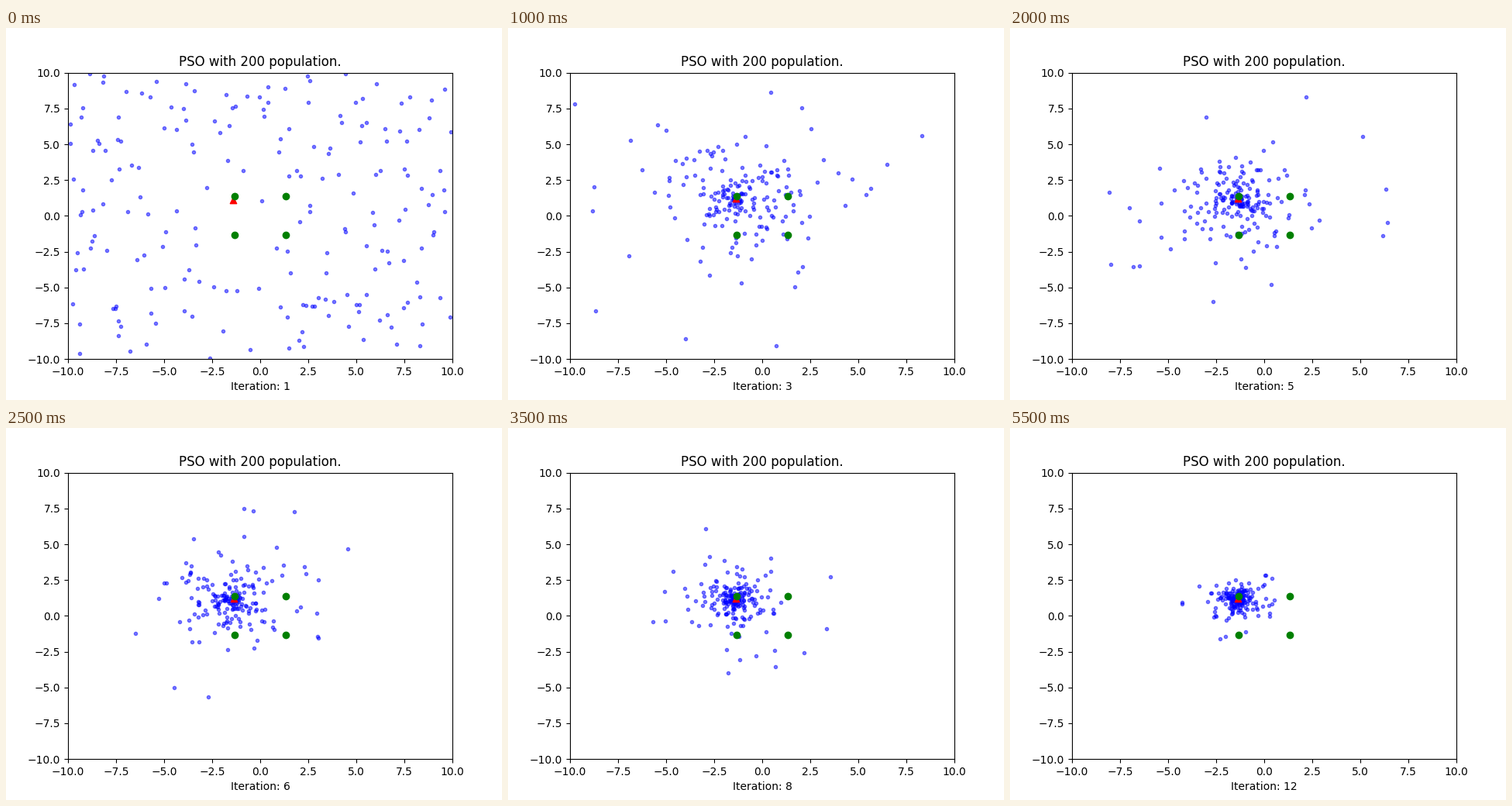
A matplotlib script for the animation above (6000 ms loop, 640 by 480 pixels).

```python
import numpy as np
import matplotlib.pyplot as plt
from matplotlib.animation import FuncAnimation

COUNT, STEPS = 200, 12
CENTER = np.array([-1.4, 1.15])
OPTIMUM = 1.3494

plt.rcParams["text.kerning_factor"] = 6  # whole-pixel glyph spacing


def scatter_start(rng):
    """Uniform start, thinner around the middle left."""
    points = rng.uniform(-10, 10, (4 * COUNT, 2))
    reach = np.hypot((points[:, 0] + 2) / 5, (points[:, 1] - 0.5) / 6.5)
    return points[reach > rng.random(len(points))][:COUNT]


def build_swarm():
    """First jump along the ray to the best point, then shrinking swings around it."""
    rng = np.random.default_rng(7)
    start = scatter_start(rng)
    offset = start - CENTER
    angle = np.arctan2(offset[:, 1], offset[:, 0])
    swarm = [start, CENTER + rng.uniform(-0.5, 1, (COUNT, 1)) * offset]
    swing = rng.normal(size=COUNT)
    for step in range(2, STEPS):
        swing = 0.3 * swing + 0.954 * rng.normal(size=COUNT)
        angle = angle + rng.normal(0, 0.25, COUNT)
        # The cubic term throws a few particles far out.
        reach = np.clip(swing, -2.4, 2.4)
        radius = 2.6 * 0.865 ** (step - 3) * reach * (1 + reach ** 2 / 12)
        ray = np.column_stack([np.cos(angle), np.sin(angle)])
        swarm.append(CENTER + radius[:, None] * ray)
    return swarm


swarm = build_swarm()

fig, ax = plt.subplots(figsize=(6.4, 4.8), dpi=100)
ax.set(xlim=(-10, 10), ylim=(-10, 10), title="PSO with 200 population.")
particles = ax.scatter(*swarm[0].T, marker=".", color="blue", alpha=0.5)
best = ax.scatter([-1.4], [1.08], marker="^", color="red")
ax.scatter([OPTIMUM, OPTIMUM, -OPTIMUM, -OPTIMUM],
           [OPTIMUM, -OPTIMUM, OPTIMUM, -OPTIMUM], marker="o", color="green")


def update(step):
    particles.set_offsets(swarm[step])
    best.set_offsets([(-1.4, 1.08) if step < 2 else (-1.37, 1.21)])
    ax.set_xlabel(f"Iteration: {step + 1}")
    return particles, best


anim = FuncAnimation(fig, update, frames=STEPS, interval=500,
                     init_func=lambda: update(0), repeat=True, repeat_delay=0)
plt.show()
```
